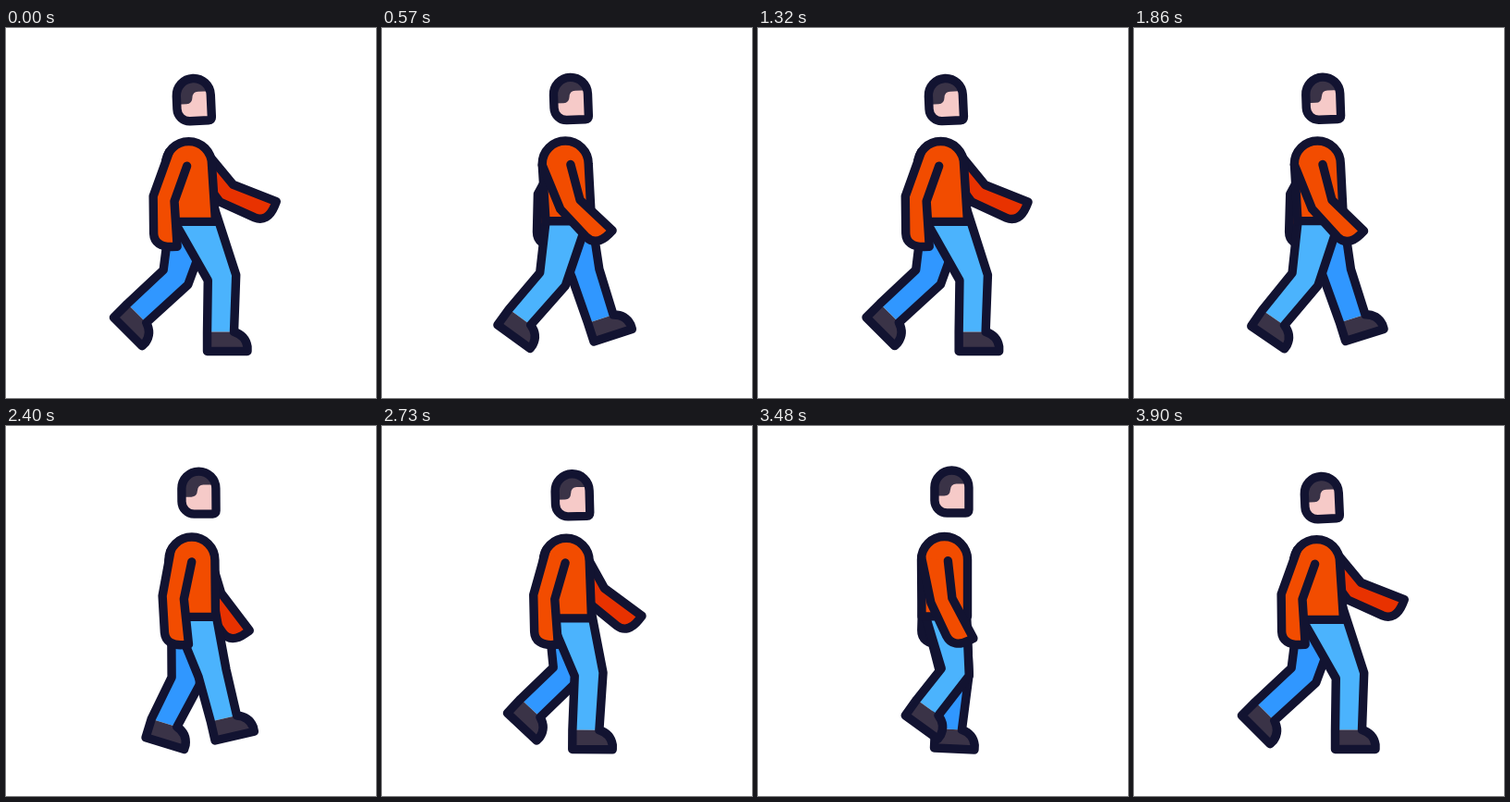
An HTML page with a canvas that plays this animation: 400 px wide and 400 px high, repeating every 3930 ms.

```html
<!DOCTYPE html>
<html>
<head>
<meta charset="utf-8">
<title>Walking man</title>
<style>
  html, body { margin: 0; width: 100%; height: 100%; overflow: hidden; background: #fff; }
  canvas { display: block; width: 400px; height: 400px; }
</style>
</head>
<body>
<canvas id="stage" width="400" height="400"></canvas>
<script>
const ctx = document.getElementById('stage').getContext('2d');
const LOOP = 3930, STEP = 30, CYCLE = 1300, RAD = Math.PI / 180;
const INK = '#121331', SHIRT = '#f24c00', SHIRT_FAR = '#e83200', JEANS = '#4bb3fd',
      JEANS_FAR = '#3097ff', DARK = '#3a3347', SKIN = '#f6cac8';

// Leg poses: knee x, y, ankle x, y, foot tilt in degrees
const down = [233.5, 270, 232, 328.5, 0];
const mid = [214, 268, 208, 328, 2];
const push = [193.5, 273, 175.5, 322.5, 13];
const pushFar = [194, 276, 171, 321, 17];
const lift = [184.5, 271.5, 149, 312.5, 36];
const back = [183.5, 269.5, 141.5, 308.4, 45];
const swing = [212, 266, 180, 304, 38];
const reach = [223, 267, 235.4, 316.3, -13];
const reachFar = [221.5, 268, 228.5, 316.5, 7.5];
const strike = [220, 265, 236.3, 314.5, -18];

const TIMES = [0, 215, 430, 570, 650, 865, 1100, 1220];
const NEAR = [down, mid, push, lift, back, swing, reach, strike];
const FAR = [back, swing, reachFar, strike, down, mid, pushFar, lift];

// Smooth periodic curve that comes to rest at both full strides
function poseAt(poses, t) {
  const n = poses.length;
  const time = i => TIMES[(i + n) % n] + Math.floor(i / n) * CYCLE;
  const pose = i => poses[(i + n) % n];
  let i = n - 1;
  while (TIMES[i] > t) i--;
  const h = time(i + 1) - time(i), s = (t - time(i)) / h, r = 1 - s;
  return pose(i).map((p, k) => {
    const slope = j => j % 4 ? (pose(j + 1)[k] - pose(j - 1)[k]) / (time(j + 1) - time(j - 1)) : 0;
    return p * (1 + 2 * s) * r * r + pose(i + 1)[k] * s * s * (3 - 2 * s)
      + h * s * r * (slope(i) * r - slope(i + 1) * s);
  });
}

// Maps local points into a frame at (x, y) turned clockwise by deg
function frame(x, y, deg) {
  const c = Math.cos(deg * RAD), s = Math.sin(deg * RAD);
  return (px, py) => [x + px * c - py * s, y + px * s + py * c];
}

const boneAngle = (x0, y0, x1, y1) => Math.atan2(x0 - x1, y1 - y0) / RAD;

function trace(points, path = new Path2D()) {
  points.forEach(p => path.lineTo(...p));
  return path;
}

function paint(path, fill) {
  ctx.fillStyle = fill;
  ctx.fill(path);
  ctx.stroke(path);
}

function leg([kx, ky, ax, ay, tilt], hx, hy, color) {
  const thigh = boneAngle(hx, hy, kx, ky), shin = boneAngle(kx, ky, ax, ay);
  const hip = frame(hx, hy, thigh), knee = frame(kx, ky, (thigh + shin) / 2);
  const foot = frame(ax, ay, tilt);
  const front = [hip(23, 0), knee(15.5, 0), foot(14.5, 0)];
  const rear = [foot(-14.5, 0), knee(-15.5, 0), hip(-23.5, 0)];
  const addShoe = path => {
    path.bezierCurveTo(...foot(21, 2), ...foot(27.5, 7), ...foot(29, 16));
    return trace([foot(29, 21), foot(-14.5, 21)], path);
  };
  ctx.fillStyle = color;
  ctx.fill(trace([...front, ...rear]));
  ctx.fillStyle = DARK;
  ctx.fill(trace([rear[0]], addShoe(trace([front[2]]))));
  const outline = trace(rear, addShoe(trace(front)));
  outline.closePath();
  ctx.stroke(outline);
}

function arm(px, py, upper, lower, length, front, rear, color) {
  const [ex, ey] = frame(px, py, upper)(0, 55);
  const elbow = frame(ex, ey, (upper + lower) / 2), hand = frame(ex, ey, lower);
  const path = trace([front, elbow(11.5, 0), hand(12.5, length), hand(7, length)]);
  path.bezierCurveTo(...hand(-5, length), ...hand(-12.5, length - 5), ...hand(-12.5, length - 15));
  trace([elbow(-12, 0), rear], path);
  paint(path, color);
}

function head(x, y, tilt) {
  ctx.save();
  ctx.translate(x, y);
  ctx.rotate(tilt * RAD);
  const face = new Path2D('M-18.5-4.5A18.5 18.5 0 0 1 18.5-4.5V19.5Q18.5 23 15 23H-5A13.5 13.5 0 0 1-18.5 9.5Z');
  ctx.fillStyle = SKIN;
  ctx.fill(face);
  ctx.fillStyle = DARK;
  ctx.fill(new Path2D('M-18.5 4.5H-8Q-2 4.5-1.5-2Q-1-8.5 5-8.5H18.5V-4.5A18.5 18.5 0 0 0-18.5-4.5Z'));
  ctx.stroke(face);
  ctx.restore();
}

function draw(t) {
  const turn = 2 * Math.PI * t / CYCLE;
  const stride = Math.cos(turn), bob = Math.cos(2 * turn);
  const curve = (a, b, c) => a + b * stride + c * stride * stride;
  const cx = 200 - 2.5 * bob, cy = 145.7 + 1.9 * bob;
  const hipY = 195 + 2 * bob, belt = 207.2 + 2.2 * bob;

  ctx.clearRect(0, 0, 400, 400);
  ctx.lineWidth = 9.4;
  ctx.lineJoin = ctx.lineCap = 'round';
  ctx.strokeStyle = INK;

  const farX = cx + 8, farY = cy - 13, farUpper = curve(9, -33, -13);
  const farTop = frame(farX, farY, farUpper);
  arm(farX, farY, farUpper, curve(-9, -33, -25), 53,
    farTop(9, 6), farTop(-11.5, 6), SHIRT_FAR);

  leg(poseAt(FAR, t), 202, hipY, JEANS_FAR);
  leg(poseAt(NEAR, t), 202, hipY, JEANS);

  const body = trace([[177, belt], [cx - 25, cy]]);
  body.arc(cx, cy, 25, Math.PI, 0);
  body.lineTo(226.5, belt);
  body.closePath();
  paint(body, SHIRT);

  const upper = 11 + 18 * stride;
  arm(cx, cy - 11, upper, curve(-14, 23, -11), 52,
    frame(cx, cy - 11, upper)(4.5, 12), frame(cx, cy, upper + 3)(-25, 0), SHIRT);

  head(207 - 4 * bob, 73.5 + 4 * bob, -1 - 1.6 * bob);
}

const start = performance.now();
function tick() {
  const t = (performance.now() - start) % LOOP;
  draw(Math.floor(t / STEP) * STEP % CYCLE);
  requestAnimationFrame(tick);
}
tick();
</script>
</body>
</html>
```
